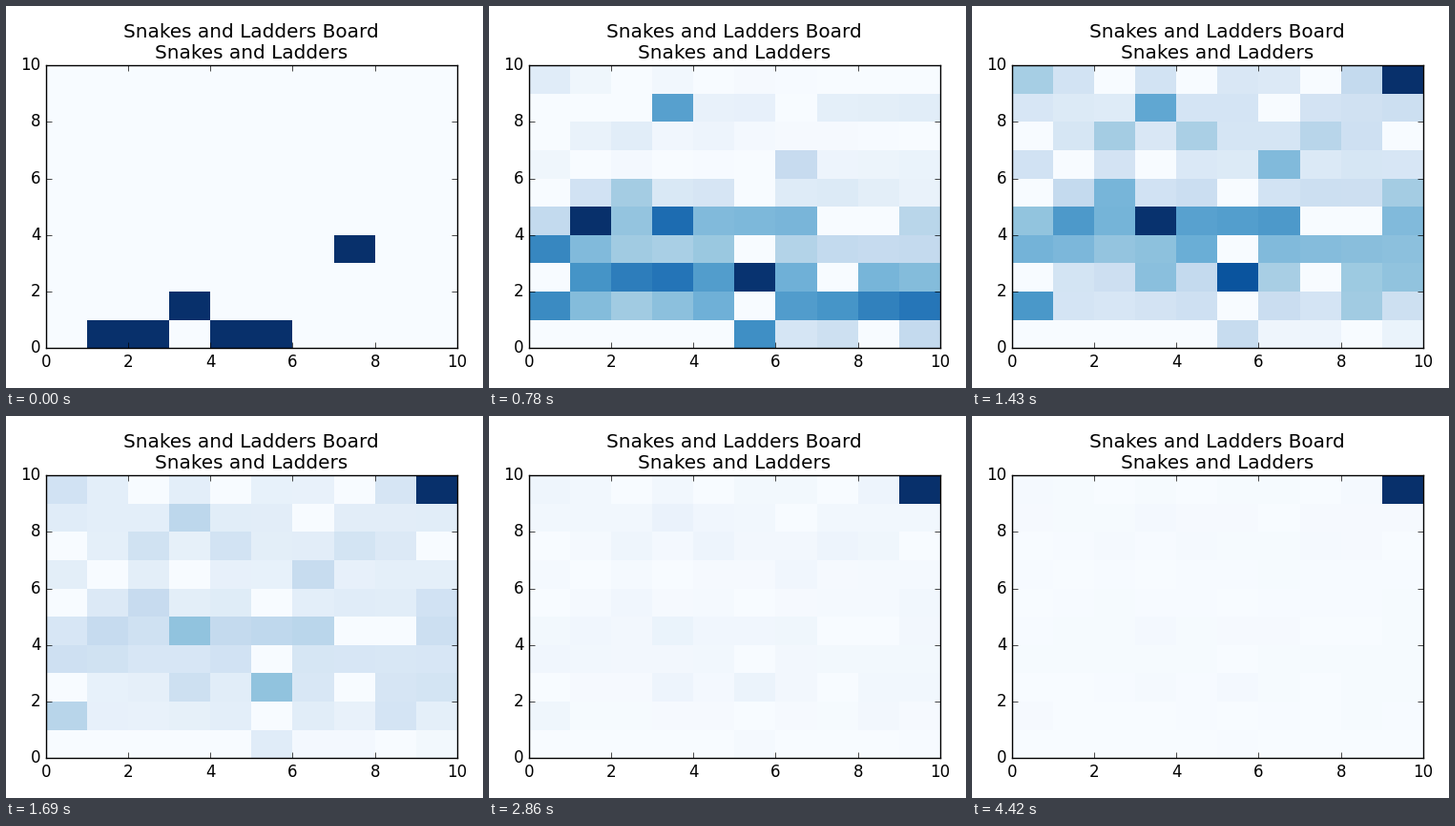
These frames come from a looping animation (500 px wide and 400 px high, 4.55 s). A matplotlib script:

```python
import numpy as np
import matplotlib.pyplot as plt
from matplotlib.animation import FuncAnimation

plt.style.use("classic")
plt.rcParams["font.family"] = "DejaVu Sans"

WIDTH, HEIGHT, DPI = 500, 400, 100
FRAMES, INTERVAL = 35, 130
LAST = 100

# Rules of the game: the square landed on leads to another square.
LADDERS = {1: 38, 4: 14, 9: 31, 21: 42, 28: 84, 36: 44, 51: 67, 71: 91, 80: 99}
SNAKES = {16: 6, 48: 26, 49: 11, 56: 53, 62: 19, 64: 60, 87: 24,
          93: 73, 95: 75, 98: 78}
JUMPS = LADDERS | SNAKES


def transition_matrix():
    """Chance of moving between squares; rolling past the end also wins."""
    matrix = np.zeros((LAST + 1, LAST + 1))
    for square in range(LAST):
        for roll in range(1, 7):
            landing = min(square + roll, LAST)
            matrix[square, JUMPS.get(landing, landing)] += 1 / 6
    matrix[LAST, LAST] = 1
    return matrix


def board_history(turns):
    """Board of probabilities after 1, 2, ... turns, starting off the board."""
    matrix = transition_matrix()
    state = np.zeros(LAST + 1)
    state[0] = 1
    boards = []
    for _ in range(turns):
        state = state @ matrix
        boards.append(state[1:].reshape(10, 10))
    return boards


boards = board_history(FRAMES)

fig = plt.figure(figsize=(WIDTH / DPI, HEIGHT / DPI), dpi=DPI, facecolor="white")
ax = fig.add_axes([41.85 / WIDTH, 41.75 / HEIGHT, 431 / WIDTH, 296 / HEIGHT])
edges = np.arange(11)
mesh = ax.pcolormesh(edges, edges, boards[0], cmap="Blues")
ax.set(xlim=(0, 10), ylim=(0, 10), xticks=edges[::2], yticks=edges[::2])
ax.set_title("Snakes and Ladders Board\nSnakes and Ladders")


def update(frame):
    # The first turn is held for two frames.
    board = boards[max(frame, 1) - 1]
    mesh.set_array(board)
    mesh.set_clim(0, board.max())
    return [mesh]


anim = FuncAnimation(fig, update, frames=FRAMES, interval=INTERVAL, repeat=True)
plt.show()
```
